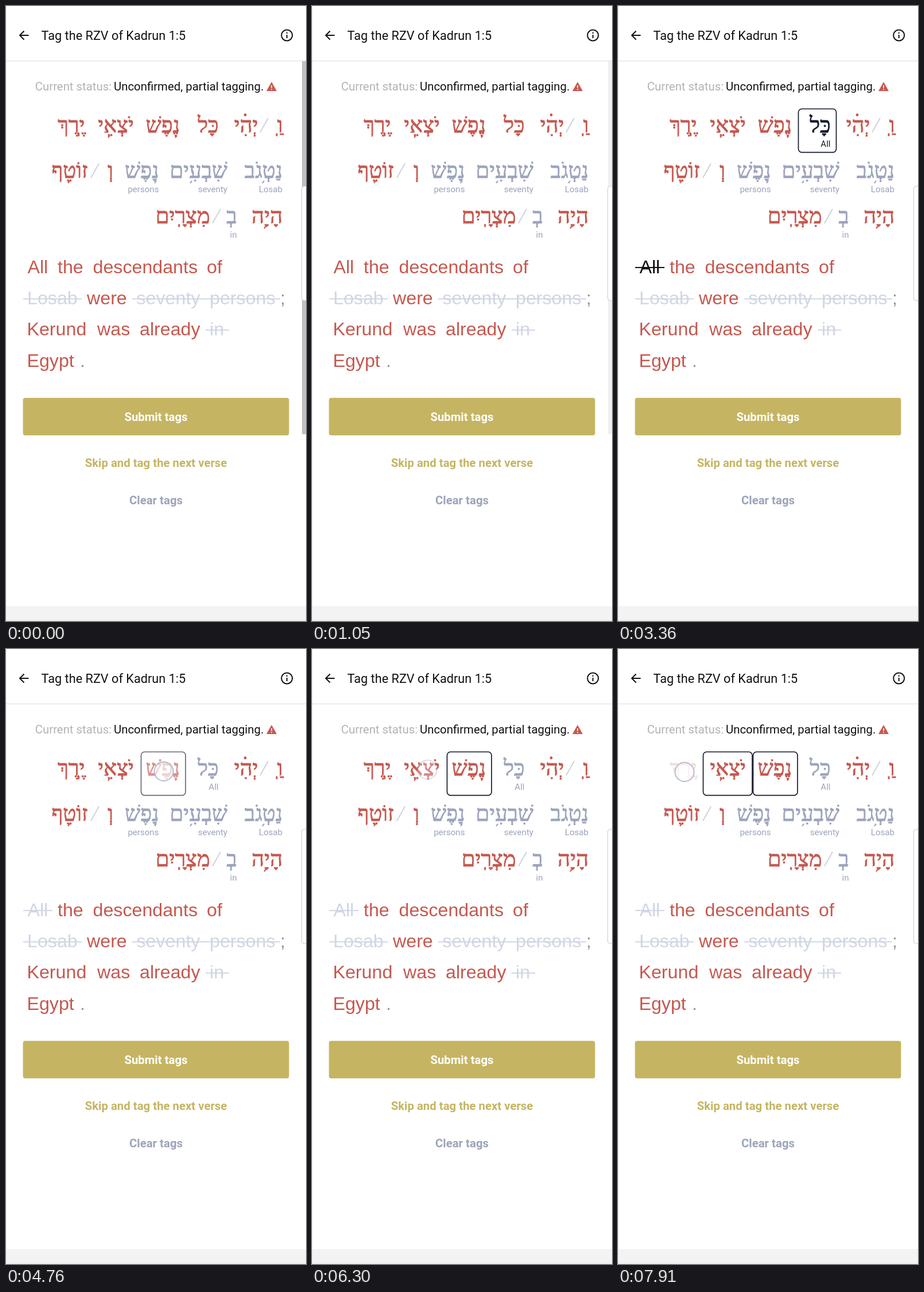
Write an HTML page that moves like this. It is 523 px wide and 1070 px high and loops after 8 s.

```html
<!DOCTYPE html>
<html lang="en">
<head>
<meta charset="utf-8">
<title>Verse tagging</title>
<style>
  html, body { margin: 0; width: 100%; height: 100%; overflow: hidden; background: #fff; }
  svg { display: block; width: 100%; height: 100%; }
  text { font-family: Roboto, sans-serif; font-size: 20.35px; white-space: pre; }
  .title { font-size: 21.7px; }
  .bold { font-weight: 700; text-anchor: middle; }
  .label { font-size: 15.1px; text-anchor: end; }
  .verse { font-family: "Liberation Sans", Arial, sans-serif; font-size: 32.2px; }
  .hebrew {
    font-family: "Liberation Serif", "Times New Roman", serif; font-size: 38px; direction: rtl;
    stroke: currentColor; stroke-width: .9px;
  }
  #words, #verse { fill: currentColor; }
</style>
</head>
<body>
<svg id="stage" viewBox="0 0 523 1070" xmlns="http://www.w3.org/2000/svg">
  <rect width="523" height="1070" fill="#fff"/>
  <path d="M.5 0V1070" stroke="#f1f1f1"/>
  <path d="M0 95.5H523" stroke="#e6e6e6" stroke-width="1.3"/>
  <rect x="1" y="1044" width="522" height="25" fill="#f3f3f3"/>
  <path d="M1 1068.8H523" stroke="#e4e4e4"/>

  <g fill="none" stroke="#111" stroke-width="2">
    <path d="M39.500 51H24M31.500 43.500L24 51L31.500 58.500"/>
    <circle cx="489.700" cy="51" r="9.500"/>
    <path d="M489.700 50V56M489.700 45.800V47.900"/>
  </g>
  <text class="title" x="61.500" y="58.700" fill="#111">Tag the RZV of Kadrun 1:5</text>

  <text x="50.800" y="147" fill="#b3b3b3">Current status:</text>
  <text x="188" y="147" fill="#111">Unconfirmed, partial tagging.</text>
  <path d="M463 132L472 148H454Z" fill="#c95850"/>
  <path d="M463 138V142.500M463 144.200V146" stroke="#fff" stroke-width="1.7"/>

  <rect id="scrollbar" x="516" y="96" width="7" height="649" fill="#c1c1c1"/>
  <path d="M524 313.500H521Q515.500 313.500 515.500 319V507Q515.500 512.500 521 512.500H524"
        fill="#fff" stroke="#cfcfcf" stroke-width="1.2"/>

  <g id="words"></g>
  <g id="verse"></g>

  <rect x="29.500" y="681.800" width="464" height="65.200" rx="4" fill="#c5b562"/>
  <text class="bold" x="261.500" y="722" fill="#fff">Submit tags</text>
  <text class="bold" x="261.500" y="802" fill="#c5b562">Skip and tag the next verse</text>
  <text class="bold" x="261.500" y="867" fill="#9ca4b9">Clear tags</text>

  <circle id="touch" r="16.500" fill="#fff" fill-opacity=".6" stroke="#b4bbd0" stroke-width="2"/>
</svg>
<script>
const LOOP = 8000, STEP = 70;
const RED = "#c5584f", MUTED = "#9ca4bb", PALE = "#d0d6e3", DARK = "#141a2c", PUNCT = "#999";
const byId = id => document.getElementById(id);

function add(parent, tag, attrs, content = "") {
  const node = document.createElementNS("http://www.w3.org/2000/svg", tag);
  for (const key in attrs) node.setAttribute(key, attrs[key]);
  node.textContent = content;
  parent.append(node);
  return node;
}

// A Hebrew word set from its right edge, with an optional accent, tag and frame.
function hebrewWord(text, right, row, { color = RED, accent, tag, frame } = {}) {
  const y = 219.6 + 79 * row;
  const group = add(byId("words"), "g", { color });
  add(group, "text", { class: "hebrew", x: right, y }, text);
  if (accent) add(group, "path", { d: `M${accent} ${y + 5.5}l-3 4`, stroke: "currentColor", "stroke-width": 2.2 });
  const label = tag && add(group, "text", { class: "label", x: right, y: y + 25.6 }, tag);
  const box = frame && add(group, "rect", {
    x: frame[0], y: 179, width: frame[1] - frame[0], height: 75.7, rx: 6,
    fill: "none", stroke: DARK, "stroke-width": 1.7
  });
  return { group, label, box };
}

function slash(x, row) {
  add(byId("words"), "path", { d: `M${x} ${220 + 79 * row}l14 -25`, stroke: "#c8ccd6", "stroke-width": 1.6 });
}

function verseWord(text, x, line, color = RED, strike) {
  const y = 464.6 + 54.4 * line;
  const group = add(byId("verse"), "g", { color });
  add(group, "text", { class: "verse", x, y }, text);
  const rule = strike && add(group, "path", {
    d: `M${strike[0]} ${y - 9.6}H${strike[1]}`, stroke: "currentColor", "stroke-width": 2
  });
  return { group, rule };
}

hebrewWord("וַֽ", 482.5, 0);
slash(443, 0);
hebrewWord("יְהִי", 439.5, 0);
add(byId("words"), "circle", { cx: 417, cy: 189.5, r: 2.4, fill: RED });
const every = hebrewWord("כָּל", 370.5, 0, { tag: "All", frame: [314.5, 380.5] });
const soul = hebrewWord("נֶפֶשׁ", 303, 0, { accent: 298, frame: [235.5, 313] });
const issue = hebrewWord("יֹצְאֵי", 223, 0, { accent: 181, frame: [148.5, 234] });
const thigh = hebrewWord("יֶֽרֶךְ", 137.5, 0);

hebrewWord("נַטְגֹב", 482, 1, { color: MUTED, accent: 450, tag: "Losab" });
hebrewWord("שִׁבְעִים", 386, 1, { color: MUTED, accent: 324, tag: "seventy" });
hebrewWord("נָפֶשׁ", 266.5, 1, { color: MUTED, accent: 262, tag: "persons" });
hebrewWord("וְ", 187, 1);
slash(148, 1);
hebrewWord("זוֹטֵף", 142.5, 1, { accent: 111 });

hebrewWord("הָיָה", 482, 2, { accent: 453 });
hebrewWord("בְ", 402.5, 2, { color: MUTED, tag: "in" });
slash(360, 2);
hebrewWord("מִצְרָֽיִם", 355.5, 2);

const all = verseWord("All", 37.5, 0, RED, [30, 81]);
verseWord("the", 90, 0);
verseWord("descendants", 151.5, 0);
verseWord("of", 350, 0);
verseWord("Losab", 37, 1, PALE, [30, 132]);
verseWord("were", 141, 1);
verseWord("seventy", 227.5, 1, PALE, [220, 478]);
verseWord("persons", 355, 1, PALE);
verseWord(";", 478, 1, PUNCT);
verseWord("Kerund", 36.5, 2);
verseWord("was", 159, 2);
verseWord("already", 233, 2);
verseWord("in", 355, 2, PALE, [348, 389]);
verseWord("Egypt", 36.5, 3);
verseWord(".", 129, 3, PUNCT);

const taps = [
  { target: every, x: 348, y: 213, press: 1960, release: 2030, settle: 420 },
  { target: all, x: 55, y: 467, press: 3010, release: 3080, settle: 280 },
  { target: soul, x: 275, y: 213, press: 4690, release: 4760, settle: 420 },
  { target: issue, x: 201, y: 210, press: 6300, release: 6930, settle: 420 },
  { target: thigh, x: 116, y: 214, press: 7630, release: Infinity, settle: 420 }
];
const [tapEvery, tapAll, tapSoul, tapIssue] = taps.map(tap => tap.release);

const clamp = v => Math.min(1, Math.max(0, v));
const ease = v => { v = clamp(v); return v < .5 ? 2 * v * v : 1 - 2 * (1 - v) ** 2; };
const show = (node, visible) => node.setAttribute("visibility", visible ? "visible" : "hidden");

function pressOpacity(t, { press, release, settle }) {
  const rise = release + 100;
  return t < rise ? 1 - .8 * ease((t - press) / 150) : .2 + .8 * ease((t - rise) / (settle - 100));
}

function render(t) {
  byId("scrollbar").setAttribute("opacity", (1 - clamp((t - 840) / 420)) ** 2);

  const touch = byId("touch");
  touch.setAttribute("opacity", 0);
  for (const tap of taps) {
    tap.target.group.setAttribute("opacity", pressOpacity(t, tap));
    if (t < tap.press || t > tap.release + 210) continue;
    touch.setAttribute("cx", tap.x);
    touch.setAttribute("cy", tap.y);
    touch.setAttribute("opacity", clamp((t - tap.press + STEP) / 140) * (1 - clamp((t - tap.release - 80) / 130)));
  }

  const tagged = t >= tapAll, moved = t >= tapSoul;
  show(every.box, t >= tapEvery && !moved);
  show(soul.box, moved);
  show(issue.box, t >= tapIssue);
  show(every.label, tagged);
  show(all.rule, tagged);
  every.group.setAttribute("color", moved ? MUTED : tagged ? DARK : RED);
  all.group.setAttribute("color", moved ? PALE : tagged ? "#111" : RED);
}

function tick(now) {
  const t = now % LOOP;
  render(t - t % STEP);
  requestAnimationFrame(tick);
}
render(0);
requestAnimationFrame(tick);
</script>
</body>
</html>
```
